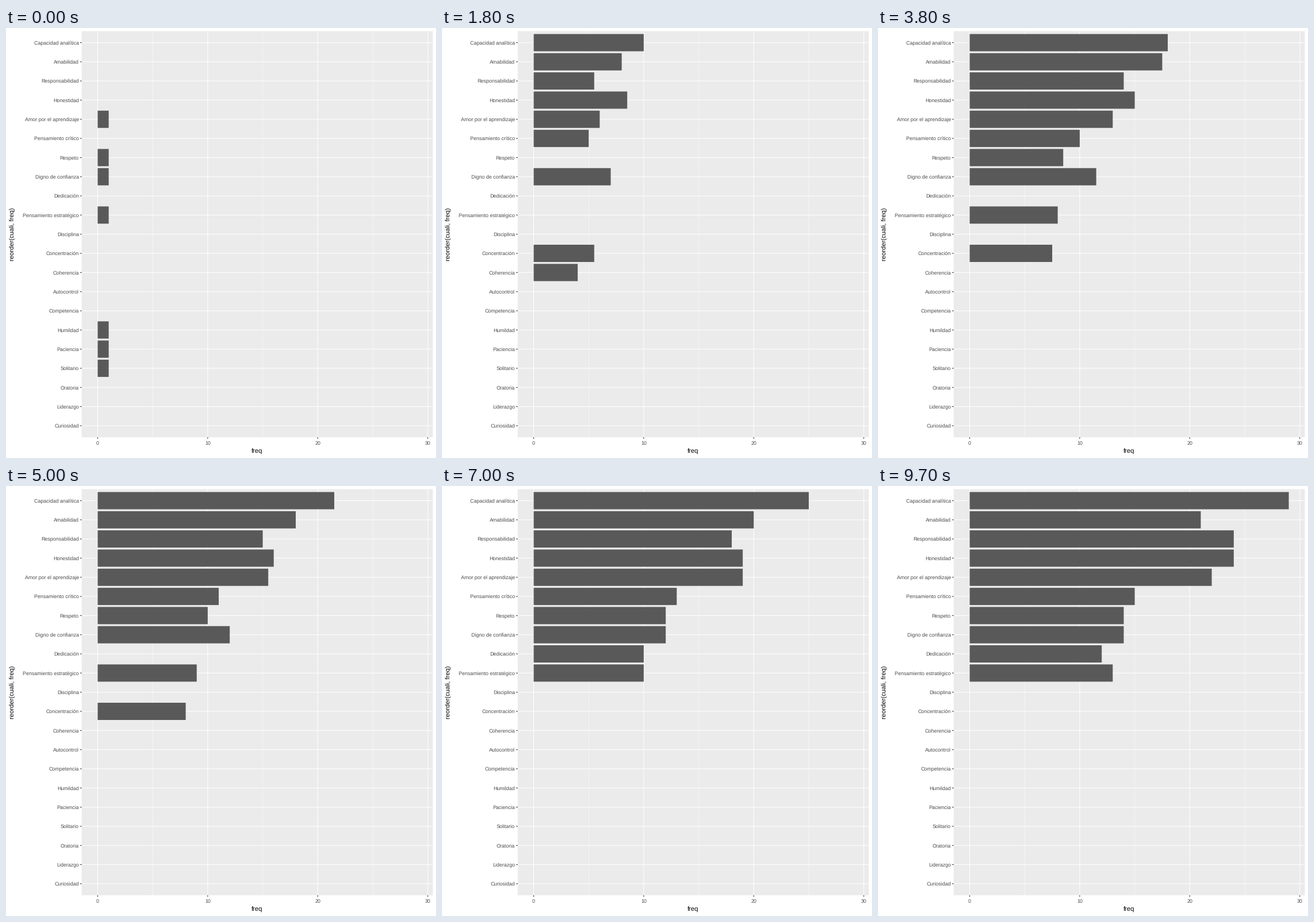
A matplotlib script that plays this animation: 748 px wide and 748 px high, repeating every 10 s.

```python
import numpy as np
import matplotlib.pyplot as plt
from matplotlib.animation import FuncAnimation
from matplotlib.patches import Rectangle

SIZE, DPI = 748, 100
FRAMES, INTERVAL = 100, 100
MARGIN = 5.5
X0, X_UNIT = 159.5, 19.14
Y_UNIT = 33.32
LEFT, RIGHT = X0 - 1.45 * X_UNIT, SIZE - MARGIN
TOP, BOTTOM = MARGIN, MARGIN + 21.2 * Y_UNIT

plt.rcParams.update({"font.family": "Liberation Sans", "text.hinting": "no_hinting"})

# Running counts at a few states; between them they grow evenly,
# after the last given one they stay.
KEYS = (0, 3, 7, 12, 16, 21, 27)
TRAITS = {
    "Capacidad analítica": (0, 7, 15, 21, 23, 28, 29),
    "Amabilidad": (0, 3, 17, 18, 20, 20, 21),
    "Responsabilidad": (0, 1, 13, 15, 16, 22, 24),
    "Honestidad": (0, 5, 14, 16, 17, 21, 24),
    "Amor por el aprendizaje": (1, 3, 11, 15, 17, 21, 22),
    "Pensamiento crítico": (0, 3, 9, 11, 12, 14, 15),
    "Respeto": (1, 2, 7, 10, 11, 14),
    "Digno de confianza": (1, 5, 11, 12, 12, 13, 14),
    "Dedicación": (0, 0, 7, 8, 10, 11, 12),
    "Pensamiento estratégico": (1, 2, 7, 9, 9, 12, 13),
    "Disciplina": (0, 0, 4, 7, 9),
    "Concentración": (0, 4, 7, 8),
    "Coherencia": (0, 3, 6),
    "Autocontrol": (0, 2, 5),
    "Competencia": (0, 3),
    "Humildad": (1, 2),
    "Paciencia": (1, 3),
    "Solitario": (1,),
    "Oratoria": (0, 2),
    "Liderazgo": (0, 2),
    "Curiosidad": (0, 2),
}


def top_ten(state):
    """Counts at a state; NaN outside the ten highest, lower rows win ties."""
    counts = np.array([np.round(np.interp(state, KEYS[:len(v)], v))
                       for v in TRAITS.values()])
    rows = range(len(counts))
    best = sorted(rows, key=lambda r: (-counts[r], -r))[:10]
    shown = np.isin(rows, best) & (counts > 0)
    return np.where(shown, counts, np.nan)


def bar_lengths(i):
    """Four frames per state, one of them halfway to the next; later three, none."""
    if i >= 67:
        return top_ten(17 + (i - 67) // 3)
    k = (i + 1) // 4
    if i % 4 == 2:
        return (top_ten(k) + top_ten(k + 1)) / 2
    return top_ten(k)


def x_px(value):
    return X0 + X_UNIT * value


def y_px(row):
    return MARGIN + Y_UNIT * (row + 0.6)


fig = plt.figure(figsize=(SIZE / DPI, SIZE / DPI), dpi=DPI, facecolor="white")
ax = fig.add_axes([0, 0, 1, 1])
ax.set(xlim=(0, SIZE), ylim=(SIZE, 0))
ax.axis("off")


def box(x0, y0, x1, y1, color, z=1):
    return ax.add_patch(Rectangle((x0, y0), x1 - x0, y1 - y0, facecolor=color,
                                  linewidth=0, snap=False, zorder=z))


def v_line(x, y0, y1, color, width=1.07):
    box(x - width / 2, y0, x + width / 2, y1, color, 2)


def h_line(y, x0, x1, color, width=1.07):
    box(x0, y - width / 2, x1, y + width / 2, color, 2)


def label(x, y, text, px, color, ha="center", **style):
    ax.text(x, y, text, fontsize=px * 72 / DPI, color=color, ha=ha,
            va="baseline", **style)


box(LEFT, TOP, RIGHT, BOTTOM, "#EBEBEB")
for value in (5, 15, 25):
    v_line(x_px(value), TOP, BOTTOM, "white", 0.53)
for value in (0, 10, 20, 30):
    v_line(x_px(value), TOP, BOTTOM, "white")
    v_line(x_px(value), BOTTOM, BOTTOM + 2.75, "#333333")
    label(x_px(value), 725, str(value), 8.9, "#4D4D4D")

bars = []
for row, name in enumerate(TRAITS):
    y, half = y_px(row), 0.45 * Y_UNIT
    h_line(y, LEFT, RIGHT, "white")
    h_line(y, LEFT - 2.75, LEFT, "#333333")
    label(LEFT - 4.95, y + 3.3, name, 8.9, "#4D4D4D", "right")
    bars.append(box(X0, y - half, X0, y + half, "#595959", 3))

label(437, 740, "freq", 11.3, "black")
label(15, 359, "reorder(cuali, freq)", 11.3, "black",
      rotation=90, rotation_mode="anchor")


def update(i):
    for bar, length in zip(bars, bar_lengths(i)):
        bar.set_width(X_UNIT * np.nan_to_num(length))
        bar.set_visible(not np.isnan(length))
    return bars


anim = FuncAnimation(fig, update, frames=FRAMES, interval=INTERVAL,
                     repeat=True, repeat_delay=0, blit=False)
plt.show()
```
